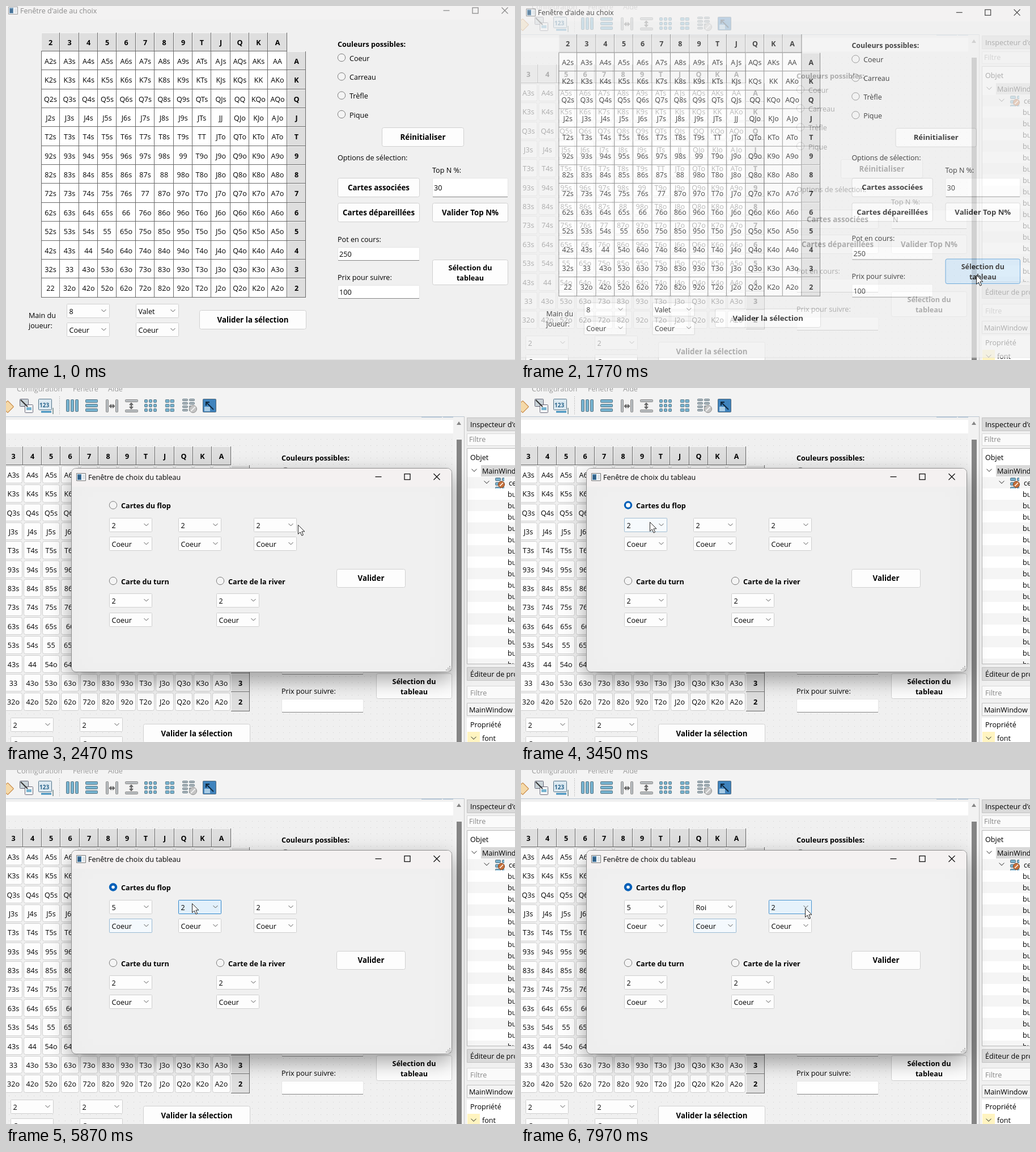
These frames come from a looping animation (898 by 624 pixels, 8 s). An HTML page with a canvas:

```html
<!DOCTYPE html>
<html lang="fr">
<head>
<meta charset="utf-8">
<title>Choix du tableau</title>
<style>
html, body { margin: 0; width: 100%; height: 100%; overflow: hidden; background: #f0f0f0; }
canvas { display: block; }
</style>
</head>
<body>
<canvas id="stage" width="898" height="624"></canvas>
<script>
const W = 898, H = 624, LOOP = 8000;
const stage = document.getElementById('stage').getContext('2d');
let ctx = stage;
const FAMILY = "'Open Sans', 'Noto Sans', sans-serif";
const RANKS = [...'23456789TJQKA'];
const VALUES = ['2', '3', '4', '5', '6', '7', '8', '9', '10', 'Valet', 'Dame', 'Roi', 'As'];

// Cursor path: time, x, y
const PATH = [
  [70, 720, 626], [240, 795, 400], [460, 770, 60], [560, 735, 4], [700, 670, 75], [870, 612, 165],
  [960, 598, 188], [1130, 650, 245], [1420, 765, 400], [1670, 803, 474], [1770, 803, 474],
  [1920, 754, 421], [2200, 640, 335], [2515, 492, 232], [2950, 225, 186], [3120, 188, 205],
  [3300, 197, 213], [3450, 227, 236], [3640, 228, 240], [3900, 222, 335], [4150, 212, 387],
  [4310, 209, 387], [4750, 206, 331], [4910, 205, 327], [5160, 205, 327], [5400, 232, 285],
  [5680, 305, 222], [5870, 328, 235], [5990, 329, 236], [6250, 343, 340], [6600, 344, 418],
  [6800, 341, 422], [6900, 342, 423], [7130, 342, 423], [7420, 395, 330], [7680, 480, 236],
  [7810, 517, 214], [7920, 517, 236], [7970, 501, 243], [8000, 501, 243]
];

const clamp = v => Math.max(0, Math.min(1, v));
const ramp = (t, a, b) => clamp((t - a) / (b - a));
const between = (t, a, b) => t >= a && t < b;

function slope(i, k) {
  const d = j => (PATH[j + 1][k] - PATH[j][k]) / (PATH[j + 1][0] - PATH[j][0]);
  if (i === 0 || i === PATH.length - 1) return 0;
  const a = d(i - 1), b = d(i);
  return a * b <= 0 ? 0 : 2 * a * b / (a + b);
}

function cursorAt(t) {
  if (t < PATH[0][0]) return { x: -50, y: -50 };
  let i = 0;
  while (i < PATH.length - 2 && t >= PATH[i + 1][0]) i++;
  const p = PATH[i], q = PATH[i + 1], dt = q[0] - p[0], u = clamp((t - p[0]) / dt);
  const at = k => p[k] * (1 + 2 * u) * (1 - u) ** 2 + q[k] * u * u * (3 - 2 * u)
    + dt * (slope(i, k) * u * (1 - u) ** 2 + slope(i + 1, k) * u * u * (u - 1));
  return { x: at(1), y: at(2) };
}

function newLayer() {
  const layer = document.createElement('canvas');
  layer.width = W;
  layer.height = H;
  return layer.getContext('2d');
}

const windowLayer = newLayer();

// Paints a whole window scaled about (cx, cy), then fades it as one picture
function group(alpha, scale, cx, cy, paint) {
  ctx = windowLayer;
  ctx.clearRect(0, 0, W, H);
  ctx.save();
  ctx.translate(cx, cy);
  ctx.scale(scale, scale);
  ctx.translate(-cx, -cy);
  paint();
  ctx.restore();
  ctx = stage;
  ctx.globalAlpha = alpha;
  ctx.drawImage(windowLayer.canvas, 0, 0);
  ctx.globalAlpha = 1;
}

function text(s, x, y, { bold = false, size = 12.6, color = '#000', align = 'left' } = {}) {
  ctx.font = `${bold ? 'bold ' : ''}${size}px ${FAMILY}`;
  ctx.fillStyle = color;
  ctx.textAlign = align;
  ctx.fillText(s, x, y + 4.6);
}

function rect(x, y, w, h, fill) {
  ctx.fillStyle = fill;
  ctx.fillRect(x, y, w, h);
}

function box(x, y, w, h, fill, stroke, r = 2) {
  ctx.beginPath();
  ctx.roundRect(x + .5, y + .5, w - 1, h - 1, r);
  ctx.fillStyle = fill;
  ctx.fill();
  ctx.strokeStyle = stroke;
  ctx.lineWidth = 1;
  ctx.stroke();
}

function line(points, color = '#222', width = 1) {
  ctx.beginPath();
  for (let i = 0; i < points.length; i += 2) ctx.lineTo(points[i], points[i + 1]);
  ctx.strokeStyle = color;
  ctx.lineWidth = width;
  ctx.stroke();
}

function disc(x, y, r, fill, stroke) {
  ctx.beginPath();
  ctx.arc(x, y, r, 0, 7);
  ctx.fillStyle = fill;
  ctx.fill();
  if (stroke) {
    ctx.strokeStyle = stroke;
    ctx.lineWidth = 1;
    ctx.stroke();
  }
}

function chevron(x, y, s = 4, color = '#555') {
  line([x - s, y - s / 2, x, y + s / 2, x + s, y - s / 2], color);
}

function combo(x, y, value, level = 0, open = false) {
  box(x, y, 76, 25, '#fdfdfd', '#cfcfcf', 1);
  if (level) {
    ctx.save();
    ctx.globalAlpha = level;
    box(x, y, 76, 25, open ? '#c6e1f6' : '#e2f0fb', '#2f86cc', 1);
    ctx.restore();
  }
  text(value, x + 4.5, y + 13);
  chevron(x + 65.5, y + 12);
}

function button(x, y, w, h, lines, state = '') {
  const look = { hover: ['#f3f9fd', '#a9cbe6'], down: ['#cfe6f8', '#3b8ed2'] }[state] || ['#fdfdfd', '#d0d0d0'];
  box(x, y, w, h, ...look, 3);
  const small = lines.length > 1;
  lines.forEach((s, i) => text(s, x + w / 2, y + h / 2 + (small ? i * 18 - 8.5 : 0),
    { bold: true, size: small ? 12.6 : 13.3, align: 'center' }));
}

function field(x, y, w, h, value) {
  box(x, y, w, h, '#fff', '#e6e6e6', 2);
  rect(x + 1, y + h - 1, w - 2, 1, '#868686');
  text(value, x + 3, y + h / 2 + .5);
}

function radio(x, y, label, { bold = false, checked = false, hover = false } = {}) {
  if (checked) {
    disc(x, y, 7.2, '#005fb8');
    disc(x, y, hover ? 3.9 : 2.8, '#fff');
  } else {
    disc(x, y, 6.7, hover ? '#e6e6e6' : '#f4f4f4', '#7c7c7c');
  }
  text(label, x + 14, y + 1, { bold });
}

function appIcon(x, y) {
  box(x, y, 17, 14, '#f4f6f8', '#777', 0);
  rect(x + 2, y + 2, 7, 10, '#4a7fa8');
  rect(x + 3, y + 4, 5, 7, '#315f86');
  rect(x + 11, y + 3, 4, 8, '#dde3e8');
}

function windowButtons(x1, x2, x3, y, color) {
  const w = 1.3;
  line([x1 - 5.5, y + .5, x1 + 5.5, y + .5], color, w);
  ctx.strokeRect(x2 - 5, y - 4.5, 10, 10);
  line([x3 - 5.5, y - 5, x3 + 5.5, y + 6], color, w);
  line([x3 - 5.5, y + 6, x3 + 5.5, y - 5], color, w);
}

function headerCell(x, y, w, h, s) {
  rect(x, y, w, h, '#dedede');
  rect(x, y, w, 1, '#f4f4f4');
  rect(x, y, 1, h, '#f4f4f4');
  rect(x + w - 1, y, 1, h, '#696969');
  rect(x, y + h - 1, w, 1, '#696969');
  text(s, x + w / 2, y + h / 2 + .5, { bold: true, align: 'center' });
}

function table(flat) {
  const pitch = 33.36, X = i => Math.round(62 + i * pitch), Y = i => Math.round(46.6 + i * pitch);
  for (let i = 0; i < 13; i++) {
    headerCell(X(i), Y(0), X(i + 1) - X(i), Y(1) - Y(0), RANKS[i]);
    headerCell(X(13), Y(i + 1), X(14) - X(13), Y(i + 2) - Y(i + 1), RANKS[12 - i]);
    for (let c = 0; c < 13; c++) {
      const r = 12 - i, x = X(c), y = Y(i + 1), w = X(c + 1) - x, h = Y(i + 2) - y;
      if (flat) {
        rect(x, y, w, h, '#696969');
        rect(x, y, w - 1, h - 1, '#fff');
      } else {
        box(x + 1, y + 1, w - 2, h - 2, '#fdfdfd', '#cdcdcd', 3);
      }
      const name = RANKS[Math.max(r, c)] + RANKS[Math.min(r, c)] + (c < r ? 's' : c > r ? 'o' : '');
      text(name, x + w / 2, y + h / 2 + .5, { align: 'center' });
    }
  }
  rect(X(0), Y(1), 1, Y(14) - Y(1), '#696969');
}

function form(live, cur, pressed) {
  const hit = (x, y, w, h) => cur && cur.x >= x && cur.x < x + w && cur.y >= y && cur.y < y + h;
  const push = (x, y, w, h, ...lines) => button(x, y, w, h, lines, hit(x, y, w, h) ? (pressed ? 'down' : 'hover') : '');
  table(live);
  text('Couleurs possibles:', 585, 67, { bold: true });
  ['Coeur', 'Carreau', 'Trèfle', 'Pique'].forEach((s, i) => {
    const y = 91 + i * 33.3;
    radio(592, y, s, { hover: hit(585, y - 9, 60, 18) });
  });
  push(663, 214, 145, 34, 'Réinitialiser');
  text('Options de sélection:', 585, 267);
  text('Top N %:', 752, 289);
  field(752, 303, 134, 34, live ? '30' : 'N');
  push(585, 303, 145, 34, 'Cartes associées');
  push(585, 347, 145, 34, 'Cartes dépareillées');
  push(752, 347, 134, 34, 'Valider Top N%');
  text('Pot en cours:', 585, 411);
  field(585, 425, 145, 24, live ? '250' : '');
  text('Prix pour suivre:', 585, 478);
  field(585, 492, 145, 24, live ? '100' : '');
  push(752, 447, 134, 45, 'Sélection du', 'tableau');
  text('Main du', 40, 545);
  text('joueur:', 40, 563);
  combo(107, 525, live ? '8' : '2');
  combo(107, 558, 'Coeur');
  combo(229, 525, live ? 'Valet' : '2');
  combo(229, 558, 'Coeur');
  push(341, 536, 189, 34, 'Valider la sélection');
}

function mainWindow(t, cur) {
  const active = t >= 1710, color = active ? '#111' : '#8c8c8c';
  rect(-14, -14, 926, 637, '#f0f0f0');
  rect(-14, -14, 926, 38, '#f3f2f2');
  rect(-14, 623, 926, 1, '#dcdcdc');
  ctx.globalAlpha = active ? 1 : .7;
  appIcon(4, 1);
  ctx.globalAlpha = 1;
  text("Fenêtre d'aide au choix", 25, 8, { color });
  windowButtons(777, 828, 880, 7.5, color);
  form(true, cur, active);
}

function gridIcon(x, y, cols, rows, color) {
  const w = 24 / cols, h = 24 / rows;
  for (let i = 0; i < cols * rows; i++)
    box(x + i % cols * w, y + Math.floor(i / cols) * h, w - 2, h - 2, color, '#56717f', 1);
}

function toolbar() {
  const blue = '#76b3d0', gray = '#b9bec1';
  rect(0, 0, W, 50, '#f3f3f3');
  text('Configuration', 19, 1, { color: '#9a9a9a' });
  text('Fenêtre', 118, 1, { color: '#9a9a9a' });
  text('Aide', 180, 1, { color: '#9a9a9a' });
  ctx.save();
  ctx.translate(3, 33);
  ctx.rotate(Math.PI / 4);
  box(-8, -8, 16, 16, '#f5d9a8', '#c4803a', 1);
  ctx.restore();
  box(24, 19, 16, 14, '#c9d3d8', '#667', 1);
  box(33, 29, 15, 15, '#fafafa', '#667', 1);
  rect(36, 34, 9, 5, blue);
  line([26, 21, 38, 33], '#333', 2);
  box(57, 19, 24, 20, '#dce9f1', '#557489', 1);
  text('123', 59, 29, { bold: true, size: 10, color: '#29658c' });
  line([62, 42, 80, 42], '#3f8fbd', 3);
  line([83, 35, 83, 46], '#355');
  for (let y = 15; y < 47; y += 3) rect(94, y, 1, 1, '#999');
  gridIcon(106, 20, 3, 1, blue);
  gridIcon(140, 20, 1, 3, blue);
  box(176, 20, 5, 23, gray, '#888', 1);
  box(193, 20, 5, 23, gray, '#888', 1);
  line([182, 32, 192, 32], '#666', 2);
  box(210, 20, 23, 5, gray, '#888', 1);
  box(210, 38, 23, 5, gray, '#888', 1);
  line([221, 26, 221, 37], '#666', 2);
  for (const [x, y, dx, dy] of [[183, 32, 3, 0], [191, 32, -3, 0], [221, 27, 0, 3], [221, 36, 0, -3]])
    line([x + dx + dy, y + dx + dy, x, y, x + dx - dy, y - dx + dy], '#666', 2);
  gridIcon(244, 20, 3, 3, blue);
  ctx.save();
  ctx.translate(281, 0);
  ctx.scale(.72, 1);
  gridIcon(0, 20, 2, 3, blue);
  ctx.restore();
  gridIcon(311, 19, 2, 4, gray);
  disc(330, 37, 6.5, '#c4c4c4', '#8f8f8f');
  line([326, 41, 334, 33], '#eee', 2);
  box(347, 19, 24, 24, '#3f83bd', '#52697a', 1);
  rect(350, 33, 10, 8, '#a7cbe5');
  line([353, 25, 366, 38], '#102a40', 2);
  line([353, 31, 353, 25, 359, 25], '#102a40', 2);
}

function sidePanel() {
  rect(809, 50, 89, 574, '#f0f0f0');
  box(813, 52, 95, 24, '#dadada', '#c2c2c2', 0);
  text("Inspecteur d'objet", 819, 64);
  box(813, 80, 95, 22, '#fafafa', '#d8d8d8', 0);
  text('Filtre', 817, 90, { color: '#888' });
  box(813, 106, 95, 381, '#fff', '#b8b8b8', 0);
  text('Objet', 819, 122);
  rect(838, 136, 60, 20, '#d9d9d9');
  chevron(826, 145, 4.5, '#222');
  text('MainWindow', 840, 146);
  rect(814, 157, 84, 20, '#f5f5f5');
  chevron(848, 166, 4.5, '#222');
  gridIcon(863, 158, 2, 3, '#79b0cc');
  rect(879, 156, 10, 28, '#f5f5f5');
  disc(874, 170, 5.5, '#c8713a', '#81411e');
  line([871, 173, 877, 167], '#fff', 1.5);
  text('centralwidget', 887, 167);
  ctx.save();
  ctx.beginPath();
  ctx.rect(814, 177, 84, 309);
  ctx.clip();
  for (let i = 0; i < 16; i++) {
    rect(814, 177 + i * 20, 84, 20, i % 2 ? '#f5f5f5' : '#fff');
    text('button', 885, 187 + i * 20);
  }
  ctx.restore();
  box(813, 492, 95, 24, '#dadada', '#c2c2c2', 0);
  text('Éditeur de propriétés', 819, 504);
  box(813, 525, 95, 23, '#fafafa', '#d8d8d8', 0);
  text('Filtre', 819, 537, { color: '#888' });
  box(813, 555, 95, 23, '#f4f4f4', '#c4c4c4', 0);
  text('MainWindow', 817, 567);
  rect(813, 581, 85, 43, '#fff');
  text('Propriété', 819, 593);
  rect(814, 606, 22, 18, '#fff4c0');
  chevron(825, 617, 4.5, '#222');
  text('font', 840, 617);
}

function background() {
  ctx = newLayer();
  const { canvas } = ctx;
  rect(0, 0, W, H, '#f0f0f0');
  for (let y = 90; y < H; y += 11)
    for (let x = 5; x < 789; x += 11) rect(x, y, 1, 1, '#cfcfcf');
  ctx.save();
  ctx.translate(-99, 56);
  form(false);
  ctx.restore();
  toolbar();
  rect(0, 50, 809, 1, '#b9c6d2');
  rect(0, 51, 789, 5, '#f0f0f0');
  rect(0, 56, 789, 24, '#fff');
  rect(733, 51, 36, 1, '#a9bfd3');
  rect(771, 51, 18, 1, '#a9bfd3');
  rect(789, 51, 20, 573, '#f2f2f2');
  ctx.beginPath();
  ctx.moveTo(795, 65);
  ctx.lineTo(799, 59);
  ctx.lineTo(803, 65);
  ctx.fillStyle = '#858585';
  ctx.fill();
  rect(795, 91, 9, 533, '#858585');
  rect(808, 50, 1, 574, '#c8c8c8');
  sidePanel();
  ctx = stage;
  return canvas;
}

function popup(x, cur, first) {
  const row = Math.max(0, Math.min(9, Math.floor((cur.y - 254) / 20)));
  rect(x + 2, 256, 75, 200, '#8a8a8a');
  box(x, 253, 76, 202, '#fff', '#9a9a9a', 0);
  rect(x + 56, 254, 19, 200, '#f0f0f0');
  box(x + 1, 254 + row * 20, 55, 20, '#cce8ff', '#99d1ff', 0);
  for (let i = 0; i < 10; i++) text(VALUES[i + first], x + 4.5, 264 + i * 20);
  rect(x + 61, 272 + first * 13.5, 9, 125, '#858585');
}

function dialog(t, cur) {
  const open1 = between(t, 3570, 5160), open2 = between(t, 5960, 7130);
  ctx.save();
  ctx.shadowColor = 'rgba(0,0,0,.36)';
  ctx.shadowBlur = 36;
  ctx.shadowOffsetY = 13;
  box(115, 141, 672, 360, '#f0f0f0', '#8d8d8d', 8);
  ctx.restore();
  ctx.beginPath();
  ctx.roundRect(116, 142, 670, 32, [7, 7, 0, 0]);
  ctx.fillStyle = '#f4f1f1';
  ctx.fill();
  appIcon(124, 150);
  text('Fenêtre de choix du tableau', 145, 157);
  windowButtons(657, 708, 760, 156, '#111');
  for (let i = 0; i < 3; i++)
    for (let j = 0; j <= i; j++) rect(782 - j * 3, 490 + i * 3, 2, 2, '#b0b0b0');

  radio(189, 206.5, 'Cartes du flop', { bold: true, checked: t >= 3150, hover: between(t, 3000, 3460) });
  radio(189, 340, 'Carte du turn', { bold: true });
  radio(378, 340, 'Carte de la river', { bold: true });
  combo(182, 229, t < 5160 ? '2' : '5', t < 5160 ? ramp(t, 3400, 3540) * (open1 ? 1 : .8) : 0, open1);
  combo(304, 229, t < 7130 ? '2' : 'Roi', t < 7130 ? ramp(t, 5700, 5850) : 0, open2);
  combo(437, 229, '2', ramp(t, 7680, 7900) * .85);
  combo(182, 262, 'Coeur', between(t, 5160, 5980) ? .35 : 0);
  combo(304, 262, 'Coeur', t >= 7130 ? .35 : 0);
  combo(437, 262, 'Coeur');
  for (const x of [182, 371]) {
    combo(x, 362, '2');
    combo(x, 396, 'Coeur');
  }
  button(583, 319, 122, 33, ['Valider'], t < 2300 ? 'hover' : '');
  if (open1) popup(182, cur, 0);
  if (open2) popup(304, cur, t < 6450 ? 0 : 3);
}

function pointer({ x, y }) {
  ctx.save();
  ctx.translate(x, y);
  ctx.beginPath();
  for (const [a, b] of [[.5, .5], [.5, 16.5], [4.2, 13], [7, 19.2], [9.6, 18], [6.9, 12], [12, 12]]) ctx.lineTo(a, b);
  ctx.closePath();
  ctx.fillStyle = '#fff';
  ctx.fill();
  ctx.strokeStyle = '#222';
  ctx.lineWidth = 1;
  ctx.stroke();
  ctx.restore();
}

const backdrop = background();

function draw(now) {
  const t = now % LOOP, cur = cursorAt(t);
  ctx.drawImage(backdrop, 0, 0);
  if (t < 1850) {
    const closing = ramp(t, 1740, 1850);
    group(1 - closing, 1 - .04 * closing, 445, 312, () => mainWindow(t, cur));
  } else {
    const opening = ramp(t, 1850, 2080);
    group(ramp(t, 1850, 1910), 1 - .1 * (1 - opening) ** 3, 378, 279, () => dialog(t, cur));
  }
  pointer(cur);
  requestAnimationFrame(draw);
}
requestAnimationFrame(draw);
</script>
</body>
</html>
```
